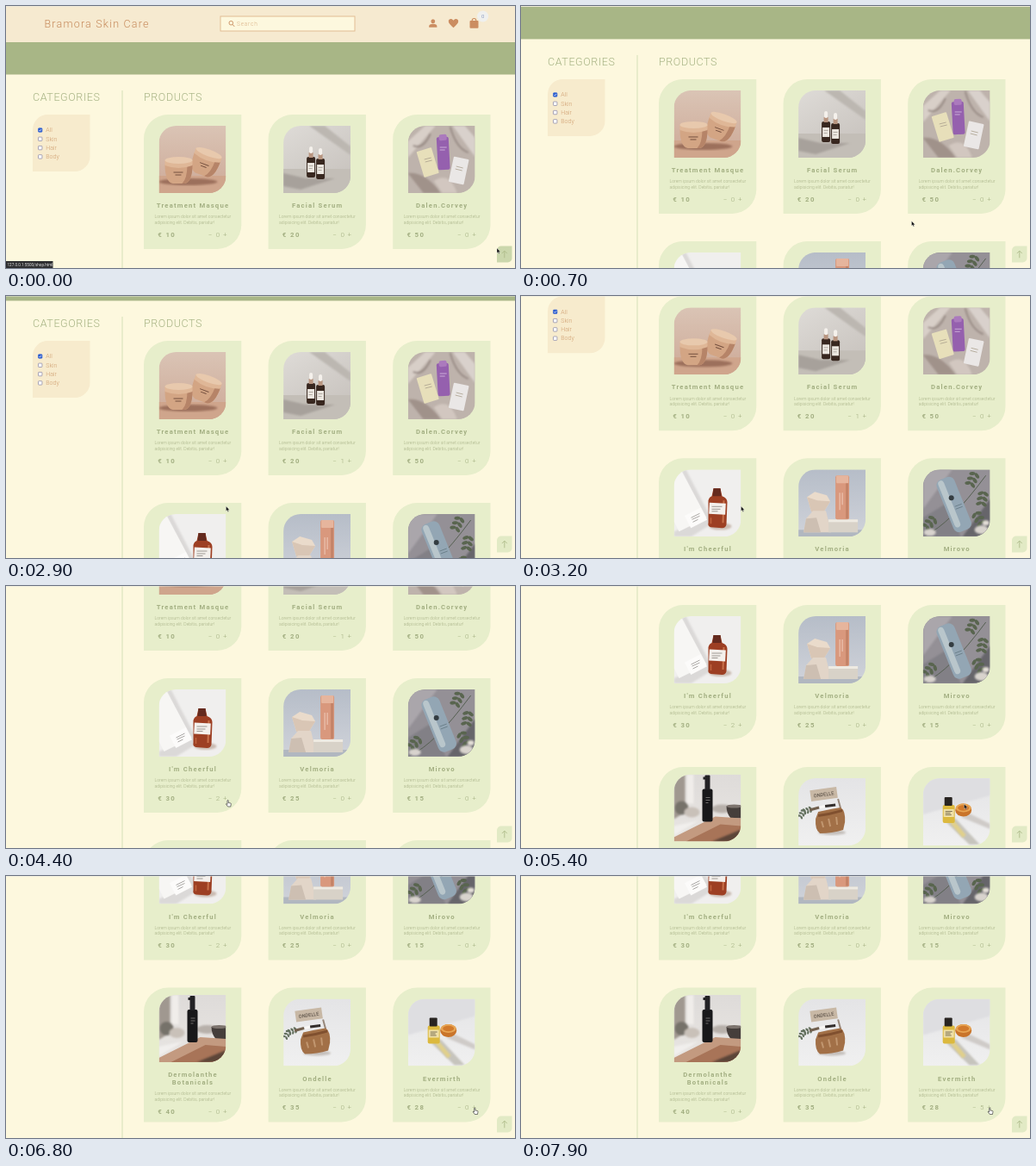
These frames come from a looping animation (591 by 304 pixels, 8000 ms). An HTML page:

```html
<!DOCTYPE html>
<html lang="en">
<head>
<meta charset="utf-8">
<title>Shop</title>
<style>
html, body { margin: 0; width: 591px; height: 304px; overflow: hidden; background: #fdf8de; }
svg { display: block; font-family: Roboto, sans-serif; }
.logo { font-size: 12.5px; font-weight: 300; letter-spacing: 1.2px; fill: #c78b5c; }
.head { font-size: 12.5px; font-weight: 300; letter-spacing: .6px; fill: #a5b283; }
.name { font-size: 7.7px; font-weight: 700; letter-spacing: 1.2px; fill: #a3af82; text-anchor: middle; }
.desc { font-size: 5.07px; font-weight: 300; fill: #a5ae84; }
.price { font-size: 7.8px; font-weight: 700; letter-spacing: 1.4px; fill: #a3af82; }
.step { font-size: 8px; font-weight: 300; fill: #a0ad7e; text-anchor: middle; }
.option { font-size: 7px; font-weight: 300; fill: #cf9d6e; }
.search { font-size: 6.5px; font-weight: 300; letter-spacing: .8px; fill: #d9ae82; }
</style>
</head>
<body>
<svg id="stage" width="591" height="304" viewBox="0 0 591 304"></svg>
<script>
const stage = document.getElementById('stage');

const text = (x, y, cls, s, more = '') => `<text x="${x}" y="${y}" class="${cls}" ${more}>${s}</text>`;
const path = (d, fill, more = '') => `<path d="${d}" fill="${fill}" ${more}/>`;
const line = (d, stroke, w = 1) => `<path d="${d}" fill="none" stroke="${stroke}" stroke-width="${w}"/>`;
const rect = (x, y, w, h, fill, r = 0, turn = 0) =>
  `<rect x="${x}" y="${y}" width="${w}" height="${h}" rx="${r}" fill="${fill}" transform="rotate(${turn} ${x + w / 2} ${y + h / 2})"/>`;
const oval = (x, y, rx, ry, fill, turn = 0) =>
  `<ellipse cx="${x}" cy="${y}" rx="${rx}" ry="${ry}" fill="${fill}" transform="rotate(${turn} ${x} ${y})"/>`;
const group = (move, inner) => `<g transform="${move}">${inner}</g>`;
const soft = inner => `<g filter="url(#blur)">${inner}</g>`;
const leaf = (x, y, w, h, r) =>
  `M${x} ${y + h}V${y + r}a${r} ${r} 0 0 1 ${r} ${-r}H${x + w}V${y + h - r}a${r} ${r} 0 0 1 ${-r} ${r}z`;
const fade = (id, a, b, slope = 0) =>
  `<linearGradient id="${id}" x2="${slope}" y2="1"><stop stop-color="${a}"/><stop offset="1" stop-color="${b}"/></linearGradient>`;

// Photos, each drawn in a 78 by 78 square
const jar = (x, y, turn) => group(`translate(${x} ${y}) rotate(${turn})`,
  path('M-16 -4Q-16 16 -7 18H7Q16 16 16 -4z', '#d3a584') +
  path('M4 18H7Q16 16 16 -4H10Q10 12 4 18z', '#b68468') +
  path('M-16 -9V-3Q0 3 16 -3V-9z', '#dfb797') + oval(0, -9, 16, 4, '#e8c9ad') +
  line('M-6 5H5M-4 8H3', '#75503f', 1));
const dropper = (x, y) => rect(x, y + 12, 10, 24, '#38271f', 2) + rect(x + 1, y + 19, 8, 11, '#ece7e0') +
  rect(x + 2.5, y + 7, 5, 6, '#b89580') + rect(x + 3, y, 4, 8, '#f5f1ec', 2) +
  line(`M${x + 2.5} ${y + 22.5}h5m-5 3h4`, '#8c837b', .6);
const sprig = (x, y, turn, fill = '#59654f') => group(`translate(${x} ${y}) rotate(${turn})`,
  [-1, 1].map(s => [0, 6, 12].map(d => oval(s * 3, d, 3.6, 2, fill, s * 30)).join('')).join(''));

const photos = [
  rect(0, 0, 78, 78, 'url(#wall)') + rect(0, 58, 78, 20, '#cfa58c') + soft(oval(34, 65, 34, 4, '#9c705c')) +
    jar(55, 40, 20) + jar(23, 49, 0),
  rect(0, 0, 78, 78, 'url(#stone)') + path('M0 50H78V78H0z', '#c3beb7') +
    soft(path('M30 0H48L78 24V34z', '#bcb7b1') + path('M0 55L26 61H60L20 74L0 70z', '#a7a19b')) +
    dropper(27, 24) + dropper(38, 26),
  rect(0, 0, 78, 78, '#beb3ac') + soft(path('M0 18L20 0H32L0 37z', '#d8cfc8') + path('M52 0L78 36V14L66 0z', '#d9d1cc') +
    path('M0 55Q20 53 38 78H18z', '#a0928a') + path('M30 64Q48 52 57 78H40z', '#d2c7c0') +
    line('M6 23Q18 28 26 9M70 31Q56 26 49 1', '#988b85', 2)) +
    rect(34, 13, 14, 38, '#9560ae', 2, -3) + rect(36, 10, 9, 7, '#ab7abd', 2, -3) +
    line('M37 25h8m-8 3h6', '#d9bfe3', .8) +
    rect(14, 27, 18, 31, '#e7dfba', 1, -17) + rect(50, 37, 18, 30, '#eae7e6', 1, 12) +
    line('M19 39l8 -2m-7 5l8 -2M56 47l8 2m-9 1l8 2', '#aaa08d', .8),
  rect(0, 0, 78, 78, '#f0efee') + soft(path('M8 0H14L46 62L20 78H0V72L36 58z', '#dbd9d8')) +
    path('M0 6L8 0L38 56L6 72L0 60z', '#f7f6f4') +
    rect(15, 48, 21, 16, '#fcfbfa', 0, -27) + line('M20 56l10 -5m-9 7l9 -4m-8 7l6 -3', '#86827f', .7) +
    soft(oval(54, 66, 13, 4, '#c9bab0')) +
    path('M44 31L46 22H54L56 31Q62 33 62 38L61 64Q60 68 56 68L43 67Q39 66 40 62L40 36Q41 32 44 31z', '#9d3f23') +
    path('M45 31L46 22H54L55 31z', '#642a1e') + line('M58 36L57 62', '#c8714b', 2) + line('M43 56V63', '#c0633e', 1.5) +
    rect(41, 39, 19, 13, '#f4f0ec', 0, 3) + line('M44 43h12m-12 3h10m-10 2.5h7', '#77716c', .7),
  rect(0, 0, 78, 78, 'url(#sky)') + rect(0, 70, 78, 8, '#b1b7c0') + group('translate(-3 -2)',
    path('M13 34L22 28L36 32L40 39L32 52L18 51z', '#eadbcb') + path('M13 34L25 38L40 39L32 52L18 51z', '#d9c6b5') +
    path('M12 59L20 50L35 50L41 75H9z', '#e2d5c8') + path('M12 59L24 58L29 75H9z', '#cdbfb2') +
    rect(38, 60, 34, 15, '#d8d2c8') + rect(38, 60, 34, 3, '#eeeae2') + rect(46, 9, 16, 51, '#d9987d', 2) +
    rect(47, 9, 14, 9, '#e6b59d', 1) + rect(58, 18, 3, 41, '#c48368') + line('M51 29v20m3 -20v14', '#f2d3c1', .9)),
  rect(0, 0, 78, 78, '#949096') + soft(path('M0 0H34L0 46z', '#aaa6ab') + path('M46 78L78 34V78z', '#66656a') +
    path('M0 56L26 40L44 78H0z', '#828086')) +
    line('M3 76Q30 65 73 7', '#566052', 1) + sprig(60, 6, 25) + sprig(70, 28, 10) + sprig(62, 52, -30) + sprig(12, 58, 45) +
    rect(25, 8, 22, 65, '#93a6b4', 7, -22) + rect(27, 11, 7, 58, '#b9c6cb', 4, -22) +
    oval(33, 33, 3, 3, '#343d42') + line('M37 43l8 -3m-7 6l8 -3', '#637780', .8) +
    soft(oval(8, 73, 7, 4, '#d8d3ce') + oval(68, 70, 8, 5, '#d8d3cd') + oval(73, 62, 4, 3, '#e4ded8')),
  rect(0, 0, 78, 78, 'url(#room)') + soft(path('M0 0H13V44L0 52z', '#a09890') + rect(15, 0, 8, 34, '#f0edea') +
    oval(9, 39, 8, 8, '#76726a') + oval(21, 44, 9, 6, '#c9c1b9') + oval(56, 40, 12, 5, '#b7b0aa')) +
    path('M61 37H78V51H66Q61 45 61 37z', '#453e3b') + oval(70, 37, 9, 2, '#7d746e') +
    path('M0 78V73L48 49L78 51V78z', '#c39a80') + path('M14 78L54 58L78 60V78z', '#a87458') +
    soft(path('M44 78L78 64V78z', '#5c4439') + path('M0 60L28 54L0 71z', '#f1efed')) +
    rect(33, 17, 12, 38, '#18181a', 2) + rect(36, 1, 6, 17, '#222124', 1) + rect(34, 3, 4, 3, '#222124') +
    line('M37 27h5m-5 3h5m-5 3h3', '#a9a5a3', .6),
  rect(0, 0, 78, 78, 'url(#paper)') + group('translate(2 35) scale(.6)', sprig(7, 6, 35, '#63705e') + sprig(20, 2, 70, '#63705e')) +
    rect(14, 12, 31, 13, '#c8b8a5', 0, -8) +
    '<text x="29.5" y="20.8" font-size="5.6" text-anchor="middle" fill="#453c35" transform="rotate(-8 29.5 18.5)">ONDELLE</text>' +
    line('M13 37L24 34', '#72604e', 3) + line('M25 34L31 32.5', '#f8f7f5', 3) + line('M31 32.5L43 31', '#332e2c', 3) +
    line('M46 24L49 35', '#97877a', 2) + soft(oval(39, 63, 16, 3, '#c4bfbb')) +
    path('M23 39Q36 36 49 34Q55 38 54 51L52 60Q39 64 25 64Q19 60 20 47z', '#a27047') +
    path('M23 42Q37 40 51 36V39Q38 43 23 45z', '#80502f') + line('M27 50l2 7m6 -10l2 9m7 -11l1 9', '#c1966f', 2),
  rect(0, 0, 78, 78, 'url(#paper)') + soft(path('M0 0H78V20L0 42z', '#dedee1') +
    path('M27 51L38 47L66 77H54z', '#c6c4bd') + path('M44 45L54 41L78 53V59z', '#cfcbc8')) +
    soft(path('M31 51L36 49L50 66L46 69z', '#e1d08a')) + rect(23, 31, 14, 21, '#dcb93e', 2) + rect(25, 22, 9, 10, '#282421', 1) +
    rect(24, 36, 12, 9, '#efe0a8') + line('M26 38.5h8m-8 2h6m-6 2h7', '#5d543f', .8) +
    oval(47, 37, 9.5, 7.5, '#c9742a') + oval(47, 34.5, 9, 5, '#e7a554') + oval(47, 34.5, 6.5, 3.2, '#d27a2c')
];

const products = [
  ['Treatment Masque', 10], ['Facial Serum', 20], ['Dalen.Corvey', 50],
  ["I'm Cheerful", 30], ['Velmoria', 25], ['Mirovo', 15],
  ['Dermolanthe|Botanicals', 40], ['Ondelle', 35], ['Evermirth', 28]
];
const clicks = { 1: [1700], 3: [3900, 4200], 8: [7000, 7200, 7400, 7600, 7800] };

function card([name, price], i) {
  const x = 160 + i % 3 * 144.6, y = 126 + Math.floor(i / 3) * 188;
  const lines = name.split('|');
  const grow = (lines.length - 1) * 4.5;
  const low = y + grow;
  return path(leaf(x, y, 113.3, 156, 28), '#e7eecb') +
    `<g transform="translate(${x + 17.5} ${y + 13 - grow})" clip-path="url(#frame)">${photos[i]}</g>` +
    lines.map((s, k) => text(x + 57, y + 108 - grow + k * 9.3, 'name', s)).join('') +
    text(x + 12.5, low + 120.4, 'desc', 'Lorem ipsum dolor sit amet consectetur') +
    text(x + 12.5, low + 126.6, 'desc', 'adipisicing elit. Debitis, pariatur!') +
    text(x + 16.2, low + 141.8, 'price', '€ ' + price) +
    text(x + 77, low + 141.8, 'step', '−') + text(x + 86, low + 141.8, 'step', '0', `id="count${i}"`) +
    text(x + 94.2, low + 141.8, 'step', '+');
}

const header = rect(0, 0, 591, 42, '#f6ead0') + text(44.5, 25, 'logo', 'Bramora Skin Care') +
  '<rect x="249" y="12" width="156" height="17" fill="#fdf8de" stroke="#e2bd94"/>' +
  '<circle cx="261.3" cy="19.7" r="2.3" fill="none" stroke="#c78b5c" stroke-width=".9"/>' + line('M263 21.4l2.2 2.4', '#c78b5c') +
  text(268, 22.8, 'search', 'Search') +
  oval(495.8, 17.7, 2.4, 2.5, '#cb8d61') + path('M491.2 24.8v-1.2q0-2.8 4.6-2.8t4.6 2.8v1.2z', '#cb8d61') +
  path('M519.5 25.2C516 22 513.8 20 513.8 17.8C513.8 14.8 517.5 14 519.5 16.8C521.5 14 525.2 14.8 525.2 17.8C525.2 20 523 22 519.5 25.2z', '#cb8d61') +
  rect(538.5, 17, 10, 8.8, '#cb8d61', 1) + line('M541.2 18v-1.2a2.3 2.3 0 0 1 4.6 0v1.2', '#cb8d61', 1.1) +
  oval(553.6, 12, 6.6, 6.4, '#eff0ee') + '<text x="553.6" y="14.2" font-size="6" text-anchor="middle" fill="#8d9cc0">0</text>' +
  rect(0, 42, 591, 37.5, '#a8b686');

const sidebar = text(31, 110, 'head', 'CATEGORIES') + path(leaf(31, 126, 66.5, 66, 17.5), '#f7ebcd') +
  ['All', 'Skin', 'Hair', 'Body'].map((s, i) => {
    const y = 144 + i * 10.3;
    return `<rect x="37.5" y="${y - 2.2}" width="4.4" height="4.4" rx=".7" fill="${i ? '#fff' : '#2f5fd0'}" stroke="${i ? '#8482a0' : '#2f5fd0'}" stroke-width=".7"/>` +
      (i ? '' : line('M38.4 144l1 1.1l1.7 -2.1', '#fff', .7)) + text(46.3, y + 2.3, 'option', s);
  }).join('') + rect(134.5, 98, 1, 700, '#d5dfb8');

stage.innerHTML = `<defs>
  ${fade('wall', '#dac4b5', '#cda997')}${fade('stone', '#dedbd7', '#c8c3be', .6)}${fade('sky', '#b6bdc8', '#d0d3da')}
  ${fade('room', '#dedbd9', '#e9e6e3')}${fade('paper', '#e4e4e6', '#f0f0f0')}
  <filter id="blur"><feGaussianBlur stdDeviation="1.2"/></filter>
  <clipPath id="frame"><path d="${leaf(0, 0, 78, 78, 20)}"/></clipPath></defs>
  <g id="page">${header}${sidebar}${text(160, 110, 'head', 'PRODUCTS')}${products.map(card).join('')}</g>
  <rect width="591" height="1" fill="#e8e8e0" opacity=".5"/>
  <path id="top" d="${leaf(570, 278.5, 17.5, 19, 5)}"/>${line('M578.8 292.3v-8.2m-3 3l3 -3l3 3', '#afbd8b', .9)}
  <g id="status">${rect(0, 296, 54.5, 8, '#2d2d2f')}<text x="1.5" y="302" font-size="4.6" fill="#e5e5e5">127.0.0.1:5500/shop.html</text></g>
  <g id="cursor"><path id="arrow" d="M0 0V5.6L1.3 4.5L2.2 6.5L3.1 6.1L2.2 4.2H4z" fill="#111" stroke="#fff" stroke-width=".3"/>
  <path id="hand" d="M0 .8Q0 0 .6 0T1.2 .8V3L3.8 3.5Q4.4 3.6 4.3 4.4L3.8 7.5H.6L-1.4 4.8Q-1.5 4 -.8 4.2L0 5z" fill="#fff" stroke="#222" stroke-width=".6"/></g>`;

// [time, scroll]
const scrollKeys = [[470, 0], [900, 74], [2900, 74], [3600, 207], [4650, 207], [5300, 292], [5500, 292], [6200, 372.5]];
// [time, x, y, hand]
const cursorKeys = [[0, 570, 281, 0], [500, 453.5, 249.5, 0], [1000, 453.5, 249.5, 0], [1500, 397, 190, 1], [2100, 397, 190, 0],
  [2800, 255.5, 244, 0], [3600, 255.5, 244, 0], [3800, 257, 248.5, 1], [4600, 257, 248.5, 0],
  [5200, 514.5, 253, 0], [5600, 514.5, 253, 0], [6300, 543.7, 269, 1]];

function at(keys, t) {
  const n = keys.findIndex(k => k[0] > t);
  if (n < 0) return keys[keys.length - 1];
  if (n === 0) return keys[0];
  const a = keys[n - 1], b = keys[n];
  const u = (t - a[0]) / (b[0] - a[0]), e = (1 - Math.cos(Math.PI * u)) / 2;
  return a.map((v, i) => i === 3 ? v : v + (b[i] - v) * e);
}

const get = id => document.getElementById(id);
const show = (id, on) => get(id).setAttribute('visibility', on ? 'visible' : 'hidden');

function draw(now) {
  const t = Math.floor(now % 8000 / 100) * 100;
  get('page').setAttribute('transform', `translate(0 ${-at(scrollKeys, t)[1]})`);
  const [, x, y, hand] = at(cursorKeys, t);
  get('cursor').setAttribute('transform', `translate(${x} ${y})`);
  show('hand', hand);
  show('arrow', !hand);
  show('status', t < 300);
  get('top').setAttribute('fill', t < 100 ? '#cbd7ac' : '#e2eac5');
  for (const i in clicks) get('count' + i).textContent = clicks[i].filter(c => c <= t).length;
}

const start = performance.now();
function loop() {
  draw(performance.now() - start);
  requestAnimationFrame(loop);
}
loop();
</script>
</body>
</html>
```
